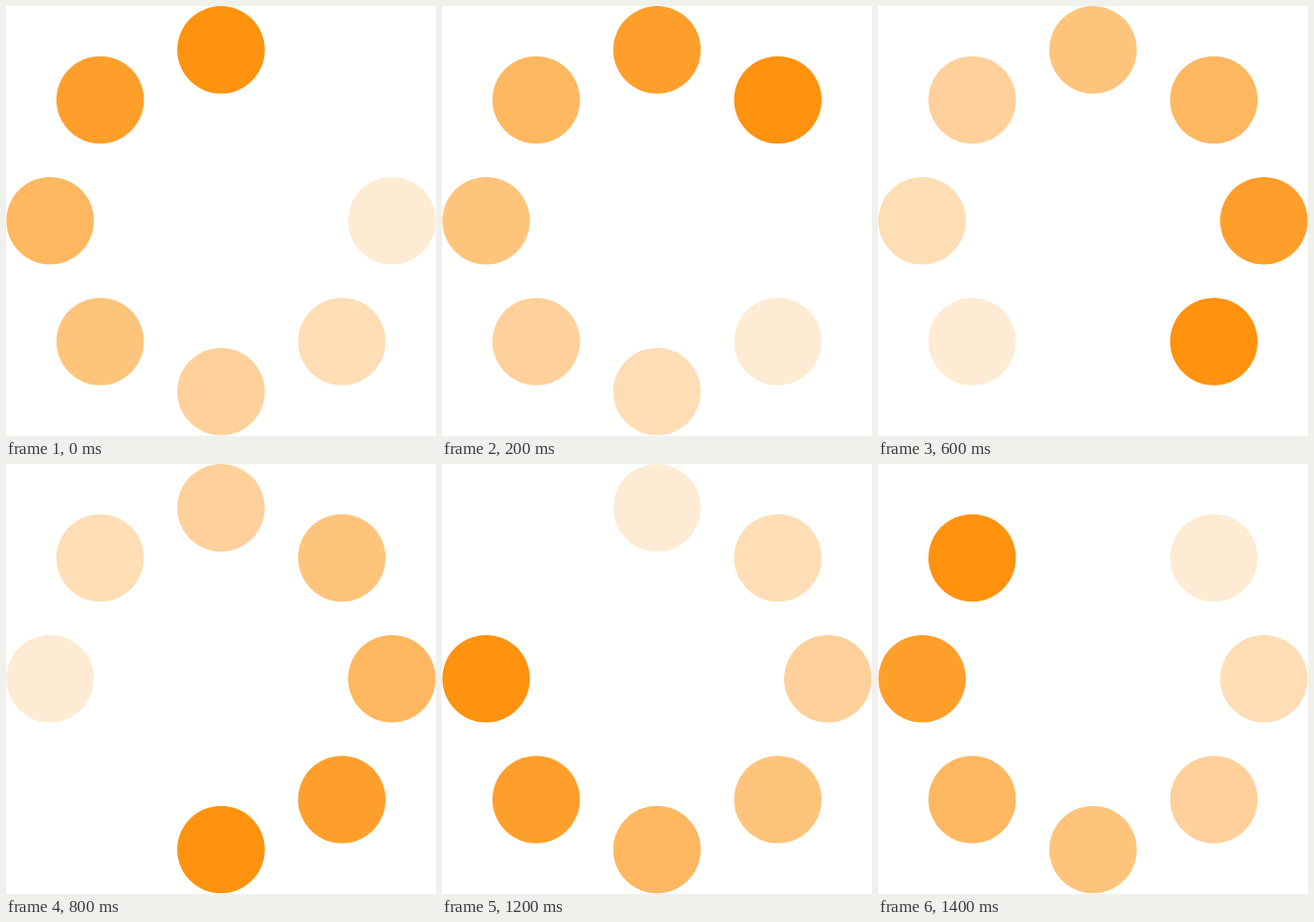
Write an HTML page that moves like this. It is 460 by 460 pixels and loops after 1.6 s.

```html
<!DOCTYPE html>
<html lang="en">
<head>
<meta charset="utf-8">
<title>Loading</title>
<style>
  html, body { margin: 0; width: 100%; height: 100%; overflow: hidden; background: #fff; }
  svg { display: block; width: 100%; height: 100%; }
</style>
</head>
<body>
<svg viewBox="0 0 460 460"></svg>
<script>
const STEP = 200, COUNT = 8, RING = 182.8, RADIUS = 46.8;
// From the leading dot back to the tail; the last place is the gap.
const COLORS = ['#ff920e', '#ff9f2b', '#ffb760', '#ffc47c', '#ffd09a', '#ffddb5', '#feebd4', 'none'];

const svg = document.querySelector('svg');
const dots = Array.from({ length: COUNT }, (_, i) => {
  const angle = i / COUNT * 2 * Math.PI;
  const dot = document.createElementNS(svg.namespaceURI, 'circle');
  dot.setAttribute('cx', 230 + RING * Math.sin(angle));
  dot.setAttribute('cy', 229.7 - RING * Math.cos(angle));
  dot.setAttribute('r', RADIUS);
  return svg.appendChild(dot);
});

const start = performance.now();

function draw(now) {
  const head = Math.floor(Math.max(0, now - start) / STEP) % COUNT;
  dots.forEach((dot, i) => dot.setAttribute('fill', COLORS[(head - i + COUNT) % COUNT]));
  requestAnimationFrame(draw);
}
draw(start);
</script>
</body>
</html>
```
